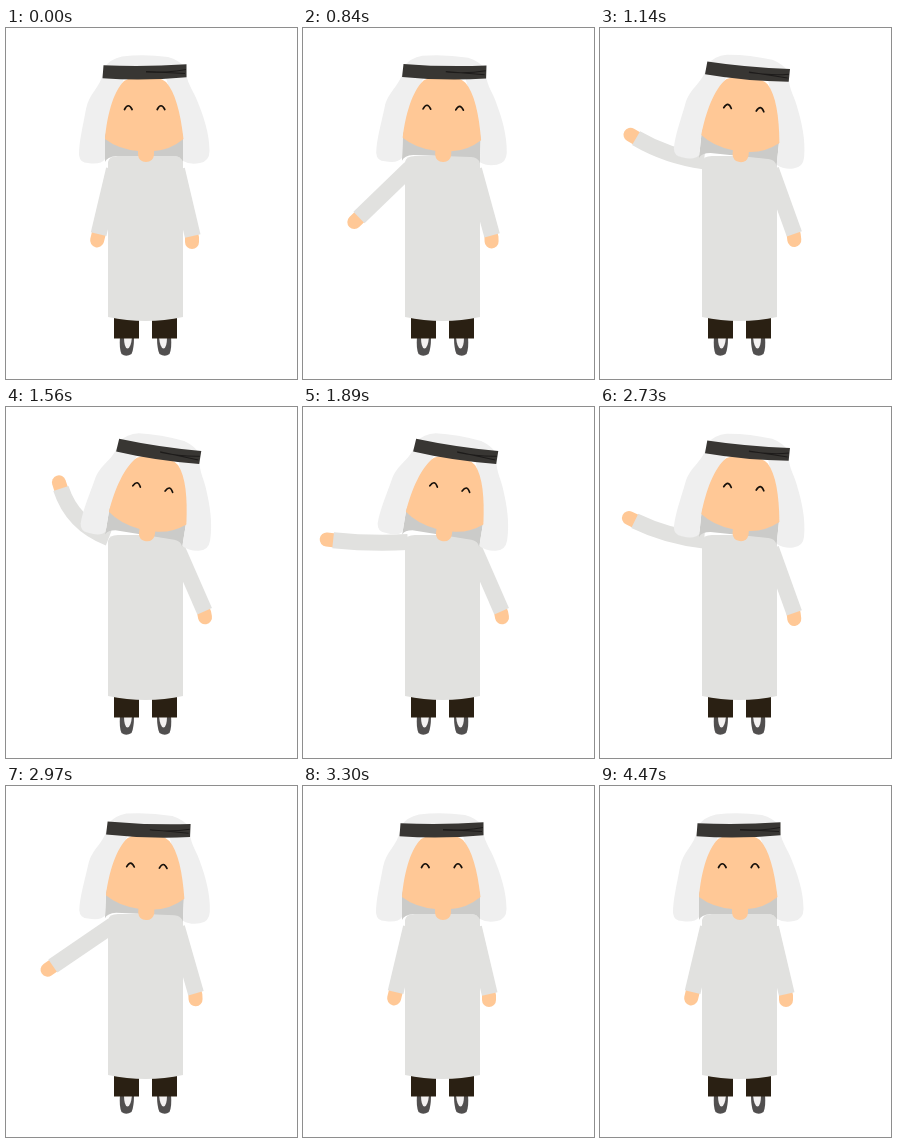
Write an HTML page that moves like this. It is 291 by 351 pixels and loops after 4500 ms.

```html
<!DOCTYPE html>
<html lang="en">
<head>
<meta charset="utf-8">
<title>Waving man</title>
<style>
  html, body { margin: 0; height: 100%; overflow: hidden; background: #fff; }
  svg { display: block; width: 100%; height: 100%; }
  .robe { fill: #e1e1df; }
  .sleeve { fill: none; stroke: #e1e1df; stroke-width: 16; }
  .skin { fill: #ffc896; }
  .hand { stroke: #ffc896; stroke-width: 14; stroke-linecap: round; }
  .scarf { fill: #efefef; }
  .eyes { fill: none; stroke: #17110b; stroke-width: 1.7; stroke-linecap: round; }
</style>
</head>
<body>
<svg viewBox="0 0 291 351">
  <defs>
    <g id="foot">
      <path fill="#514f4f" d="M114 309H128Q128 321 125.500 326Q120 329.500 115.500 326Q113 320 114 309Z"/>
      <path fill="#f3f1f1" d="M118 309H126Q125 320 121.500 320.500Q118 320 118 309Z"/>
      <path fill="#2a2013" d="M108 287H133V310.500H108Z"/>
    </g>
  </defs>
  <use href="#foot"/>
  <use href="#foot" transform="matrix(-1 0 0 1 279 0)"/>

  <path id="hand" class="hand"/>
  <path id="waver" class="sleeve"/>
  <g id="idleArm">
    <path class="hand" d="M186 209V214"/>
    <path class="sleeve" d="M171 141.500L186.700 208"/>
  </g>
  <path class="robe" d="M102 134Q103 128 112 128H168Q176 128 177 134V289Q140 297 102 289Z"/>

  <g id="head">
    <path fill="#cbcbc9" d="M99 105H177V134Q175 128 168 128H110Q101 129 99 134Z"/>
    <path class="scarf" d="M97 45C94 60 83 65 80 81C77 98 73 113 73 127Q74 135 82 135Q95 137 99 131V108L118 50H160L177 108V133Q184 137 194 135Q203.500 133 203.500 123C203.500 105 197 87 192.500 76C188 63 182 58 180 45Z"/>
    <path class="scarf" d="M98 40Q104 31 116 28.500Q138 26 162 29Q173 32 180 40Z"/>
    <path class="skin" d="M99 111C101 88 107 64 118 53Q127 48 139 48Q153 48 160 54C169 64 174.500 84 177.500 111Q164 122 148 123V127Q147 134 140 134Q133 134 132 127V123Q112 121 99 111Z"/>
    <path fill="#383633" d="M97.500 37.200Q138 39.200 180.500 36.200V49.200Q138 53 96.500 50.200Z"/>
    <path fill="none" stroke="#1d1b1a" d="M140 44Q162 45 180 41.500M140 43.500L179 45.500"/>
    <path class="eyes" d="M118.500 81.500Q122.300 74 126.100 81.500M151.200 81.500Q155 74 158.800 81.500"/>
  </g>
</svg>
<script>
const LOOP = 4500, STEP = 30, MAX_TILT = 9.2;
const $ = id => document.getElementById(id);

// [time ms, arm angle from straight down, arm reach]
const armKeys = [
  [565, 9.5, 69], [1430, 149, 75], [1916, 93, 74], [2420, 149, 75], [3300, 9.5, 69]
];
const tiltKeys = [[565, 0], [1540, MAX_TILT], [2330, MAX_TILT], [3300, 0]];

const ease = u => 0.88 * (1 - Math.cos(Math.PI * u)) / 2 + 0.12 * u;

function sample(keys, t) {
  if (t < 600) return keys[0].slice(1);
  const i = keys.findIndex(k => k[0] > t);
  if (i < 0) return keys[keys.length - 1].slice(1);
  const a = keys[i - 1], b = keys[i];
  const e = ease((t - a[0]) / (b[0] - a[0]));
  return a.slice(1).map((v, n) => v + (b[n + 1] - v) * e);
}

function drawArm(angle, reach) {
  const sin = Math.sin(angle * Math.PI / 180), cos = Math.cos(angle * Math.PI / 180);
  const startX = 105 + 3 * cos, startY = 135.5 + 6 * cos;
  const endX = 104 - reach * sin, endY = 138 + reach * cos;
  // The elbow sags more the higher the arm goes.
  const bend = 16 * (Math.max(0, angle - 60) / 78) ** 2;
  const midX = (startX + endX) / 2 + bend * cos, midY = (startY + endY) / 2 + bend * sin;
  const length = Math.hypot(endX - midX, endY - midY);
  const dx = (endX - midX) / length, dy = (endY - midY) / length;
  $('waver').setAttribute('d', `M${startX} ${startY}Q${midX} ${midY} ${endX} ${endY}`);
  $('hand').setAttribute('d', `M${endX} ${endY}l${6.5 * dx} ${6.5 * dy}`);
}

function frame(now) {
  const t = Math.floor(now % LOOP / STEP) * STEP;
  const [tilt] = sample(tiltKeys, t);
  drawArm(...sample(armKeys, t));
  $('head').setAttribute('transform', `rotate(${tilt} 139 132)`);
  $('idleArm').setAttribute('transform', `rotate(${-1.12 * tilt} 172 140)`);
  requestAnimationFrame(frame);
}
frame(performance.now());
</script>
</body>
</html>
```
